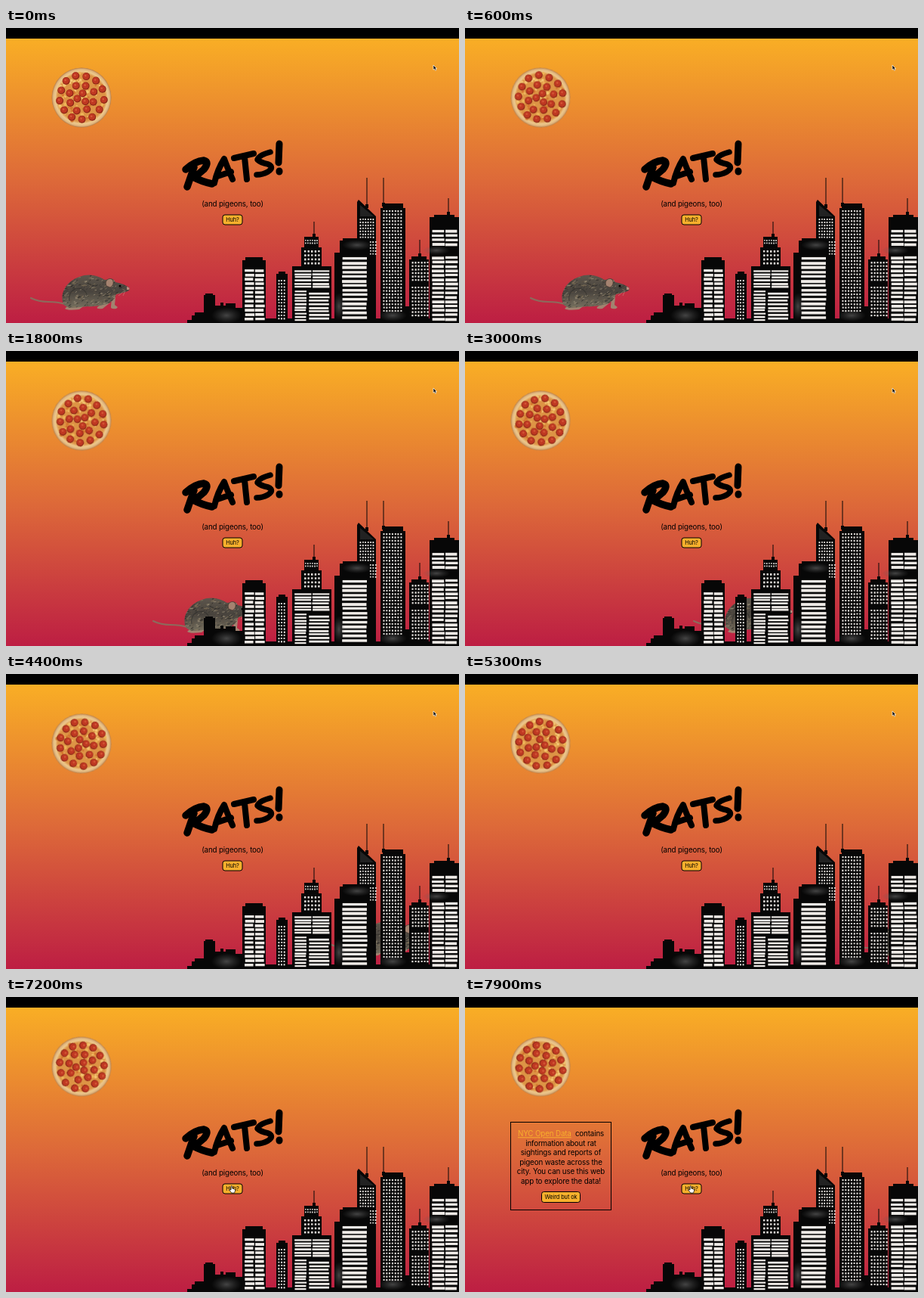
Animation, 600 px wide and 390 px high, one loop 8 s. Source, as an HTML page:

```html
<!DOCTYPE html>
<html lang="en">
<head>
<meta charset="utf-8">
<title>Rats!</title>
<style>
  html, body { margin: 0; width: 100%; height: 100%; overflow: hidden; background: #000; }
  svg { display: block; width: 600px; height: 390px; }
  text { font-family: Inter, Roboto, sans-serif; font-size: 9.8px; letter-spacing: -.15px; text-anchor: middle; }
  .button rect { fill: #f8b02c; stroke: #000; }
  .button text { font-size: 7.4px; letter-spacing: -.1px; }
  .link { fill: #f8b02c; text-decoration: underline; }
  .ink { fill: none; stroke: #000; stroke-linecap: round; stroke-linejoin: round; }
</style>
</head>
<body>
<svg viewBox="0 0 600 390">
  <defs>
    <linearGradient id="sky" x1="0" y1="0" x2="0" y2="1">
      <stop offset="0" stop-color="#f9ae25"/>
      <stop offset=".5" stop-color="#dd6939"/>
      <stop offset="1" stop-color="#bd1e43"/>
    </linearGradient>
    <linearGradient id="fur" x1="0" y1="0" x2="0" y2="1">
      <stop offset="0" stop-color="#5d564c"/>
      <stop offset=".5" stop-color="#48433d"/>
      <stop offset="1" stop-color="#77705f"/>
    </linearGradient>
    <radialGradient id="wash">
      <stop offset="0" stop-color="#777" stop-opacity=".55"/>
      <stop offset="1" stop-color="#555" stop-opacity="0"/>
    </radialGradient>
    <radialGradient id="crust">
      <stop offset=".8" stop-color="#dd9445"/>
      <stop offset=".88" stop-color="#edc98d"/>
      <stop offset=".95" stop-color="#dfb47d"/>
      <stop offset="1" stop-color="#b57a45"/>
    </radialGradient>
    <path id="body" d="M75 362C72 348 82 334 97 329C109 324 121 327 131 333L137 332Q142 330 145 336Q156 338 163 343Q165 346 161 348Q152 351 146 352Q143 362 133 365Q121 369 108 368L88 370Q77 370 75 362Z"/>
    <clipPath id="pelt"><use href="#body"/></clipPath>
  </defs>

  <rect width="600" height="390"/>
  <rect y="14" width="600" height="376" fill="url(#sky)"/>

  <g transform="translate(100 92)"><g id="pizza"></g></g>

  <g id="rat">
    <path d="M33 357Q43 362 56 362T78 365" fill="none" stroke="#8d6a5c" stroke-width="2.2" stroke-linecap="round"/>
    <path d="M84 365L78 371Q82 374 97 372L104 367M130 362L121 369Q119 372 128 371L138 363M140 358L139 368Q138 372 146 371L148 369L144 366L145 356" fill="#a28370"/>
    <use href="#body" fill="url(#fur)"/>
    <g id="hairs" clip-path="url(#pelt)" fill="none" stroke-width=".7"></g>
    <path d="M84 361Q82 349 92 345Q103 342 107 352" fill="none" stroke="#302e2b" stroke-width="1.2" opacity=".6"/>
    <path d="M133 341C130 334 136 330 140 332C144 335 142 341 138 343Z" fill="#a58370" stroke="#4b3a33" stroke-width=".8"/>
    <ellipse cx="151" cy="341" rx="1.5" ry="1.3"/>
    <path d="M160 342Q165 343 163 346L160 346Z" fill="#bd8b7e"/>
    <path d="M157 347L149 354M158 347L155 354" stroke="#d4b4a0" stroke-width=".4"/>
  </g>

  <g id="city"></g>

  <g class="ink" stroke-width="9" role="img" aria-label="Rats!">
    <path stroke-width="9.5" d="M249 184L240 210M238 187Q250 176 262 175Q270 177 262 187Q256 193 248 197Q259 203 273 206"/>
    <path stroke-width="8" d="M276 205Q280 187 289 173Q293 184 300 200M280 196L298 190"/>
    <path stroke-width="8" d="M302 172L328 166M316 171L319 200"/>
    <path stroke-width="7.5" d="M350 164Q335 168 333 174Q337 178 347 180Q356 184 347 190Q340 194 332 194"/>
    <path d="M362 153L361 178M362 189L362 190"/>
  </g>

  <text x="300" y="236">(and pigeons, too)</text>
  <g class="button">
    <rect x="287" y="247" width="26" height="13" rx="3"/>
    <text x="300" y="256.2">Huh?</text>
  </g>

  <g id="popup">
    <rect x="60.5" y="165.5" width="133" height="116" fill="none" stroke="#000"/>
    <g id="lines"></g>
    <g class="button">
      <rect x="101.5" y="257.5" width="51" height="14" rx="3"/>
      <text x="127" y="267.2">Weird but ok</text>
    </g>
  </g>

  <g id="cursor">
    <path id="arrow" d="M0 0V6.2L1.5 5L2.6 7.2L3.8 6.6L2.8 4.6H4.6Z" stroke="#fff" stroke-width=".7"/>
    <path id="hand" d="M0 0Q1-1 1.7 0V3L5 4Q6 5 5 8L4.4 9H.8L-2 5.5Q-2 4 0 5Z" fill="#fff" stroke="#000" stroke-width=".7"/>
  </g>
</svg>

<script>
const LOOP = 8000, TICK = 100, GROUND = 390;
const $ = id => document.getElementById(id);

let seed = 7;
const rnd = (a, b) => {
  seed = (seed * 16807) % 2147483647;
  return +(a + (b - a) * seed / 2147483647).toFixed(2);
};
const rect = (x, y, w, h, fill = '#070707') =>
  `<rect x="${x}" y="${y}" width="${w}" height="${h}" fill="${fill}"/>`;
const disc = (x, y, r, fill) =>
  `<circle cx="${x.toFixed(1)}" cy="${y.toFixed(1)}" r="${r}" fill="${fill}"/>`;

function drawPizza() {
  let s = disc(0, 0, 39.5, 'url(#crust)');
  for (let i = 0; i < 100; i++) {
    const a = rnd(0, 6.28), r = 33 * Math.sqrt(rnd(0, 1));
    s += disc(r * Math.cos(a), r * Math.sin(a), rnd(.8, 2.4), ['#f4c773', '#d5772f', '#edb457'][i % 3]);
  }
  // count, radius, starting angle
  for (const [n, ring, start] of [[13, 29, .1], [8, 17.5, .35], [3, 6.5, .8]]) {
    for (let i = 0; i < n; i++) {
      const a = start + i * 2 * Math.PI / n, r = ring + rnd(-1.2, 1.2);
      const x = r * Math.cos(a), y = r * Math.sin(a);
      s += disc(x, y, 5, '#8d2617') + disc(x - .3, y - .4, 4.2, '#bf3822') + disc(x - 1, y - 1, 1.3, '#d75a39');
    }
  }
  $('pizza').innerHTML = s;
}

function drawHairs() {
  let s = '';
  for (let i = 0; i < 330; i++) {
    const x = rnd(74, 160), y = rnd(326, 370);
    const tone = ['#23211f', '#8d7b5c', '#34322f', '#a79a80', '#5d5244'][i % 5];
    s += `<path d="M${x} ${y}l${rnd(-4, -1.5)} ${rnd(.2, 1.8)}" stroke="${tone}"/>`;
  }
  $('hairs').innerHTML = s;
}

// A block down to the ground with a narrower roof step
const tower = (x, top, w, inset = 0, step = 0) =>
  rect(x, top, w, GROUND - top) + rect(x + inset, top - step, w - 2 * inset, step + 1);

const spire = (x, top, base) =>
  rect(x - .5, top, 1, base - top) + rect(x - 2, base - 5, 4, 5);

// Uneven painted strips
function bars(x, y, w, bottom, columns = 1, gap = 5.8) {
  let s = '';
  const cw = w / columns;
  for (let v = y; v < bottom; v += gap)
    for (let c = 0; c < columns; c++)
      s += rect(x + c * cw + rnd(0, .8), v + rnd(-.4, .4), cw - rnd(1, 2.2), gap * .6 + rnd(-.4, .4), '#eeeae6');
  return s;
}

// Small square windows
function grid(x, y, w, bottom, size = 2) {
  let s = '';
  for (let v = y; v < bottom; v += size * 2.2)
    for (let u = x; u < x + w; u += size * 1.9)
      s += rect(u + rnd(-.2, .2), v, size, size + rnd(-.2, .5), '#e5e1dd');
  return s;
}

const wash = (x, y, rx, ry) =>
  `<ellipse cx="${x}" cy="${y}" rx="${rx}" ry="${ry}" fill="url(#wash)"/>`;

function drawCity() {
  const lowRoofs = '<path d="M240 390V386H246V380H250V376H262V353H264V351H274V353H277V367H284V363H288V367H291V364H304V370H314V390Z" fill="#070707"/>';
  const slant = '<path d="M465 300V230L467 227L490 249V390H465Z" fill="#070707"/><path d="M469 234L487 249H469Z" fill="#555" opacity=".35"/>';
  const podium = rect(313, 384, 287, 6);

  const west = tower(313, 307, 31, 4, 4) + bars(316, 319, 27, 384, 2)
    + tower(358, 325, 15, 3, 3) + grid(360.5, 333, 10, 384, 1.9);

  const middle = spire(408, 256, 277) + tower(391, 290, 27, 4, 14) + tower(379, 315, 52)
    + grid(395, 294, 21, 313, 2.4) + grid(396, 280, 18, 284, 1.6)
    + bars(382, 320, 47, 345, 2, 4.2) + bars(382, 347, 17, 386, 1, 4.2) + bars(401, 350, 28, 386, 1, 4.7);

  const tall = spire(478, 198, 238) + slant + tower(435, 297, 55) + tower(442, 281, 40, 4, 3)
    + bars(445, 303, 34, 383, 1, 6) + grid(468.5, 252, 19, 278, 1.8) + grid(482, 282, 7, 299, 1.8);

  const dotted = spire(500, 198, 236) + tower(496, 238, 33, 3, 6) + grid(499.5, 241, 26, 375)
    + tower(527, 368, 8) + spire(548, 280, 303) + tower(534, 306, 26, 3, 4)
    + grid(537.5, 309, 20, 336, 2.1) + grid(537.5, 342, 20, 382, 2.1);

  const east = spire(586, 225, 248) + tower(561, 250, 39, 6, 3)
    + bars(564, 267, 35, 287, 2) + bars(564, 302, 35, 384, 2);

  const shade = wash(292, 380, 20, 11) + wash(441, 368, 8, 18) + wash(465, 287, 20, 7)
    + wash(512, 380, 19, 8) + wash(570, 294, 18, 6);

  $('city').innerHTML = lowRoofs + podium + west + middle + tall + dotted + east + shade;
}

function drawLines() {
  const lines = ['<tspan class="link">NYC Open Data</tspan>&#160; contains', 'information about rat',
    'sightings and reports of', 'pigeon waste across the', 'city. You can use this web', 'app to explore the data!'];
  $('lines').innerHTML = lines.map((l, i) => `<text x="127" y="${(184.3 + i * 12.5).toFixed(1)}">${l}</text>`).join('');
}

// Rows are [time, style]; motion advances once per tick
function play(id, rows) {
  const frames = rows.map(([t, style], i) => {
    const span = (rows[i + 1]?.[0] ?? LOOP) - t;
    return { ...style, offset: t / LOOP, easing: `steps(${Math.max(1, Math.round(span / TICK))}, end)` };
  });
  $(id).animate(frames, { duration: LOOP, iterations: Infinity });
}
const at = (x, y) => ({ transform: `translate(${x}px, ${y}px)` });
const turn = deg => ({ transform: `rotate(${deg}deg)` });
const show = opacity => ({ opacity });
const HOVER = 6900;

drawPizza();
drawHairs();
drawCity();
drawLines();

play('pizza', [[0, turn(0)], [LOOP, turn(144)]]);
play('rat', [[0, at(0, 0)], [LOOP, at(720, 0)]]);
play('cursor', [
  [0, at(566, 49)], [5500, at(566, 49)], [5800, at(480, 100)], [6300, at(347, 177)],
  [HOVER, at(298, 250)], [LOOP, at(298, 250)],
]);
play('arrow', [[0, show(1)], [HOVER, show(1)], [HOVER, show(0)], [LOOP, show(0)]]);
play('hand', [[0, show(0)], [HOVER, show(0)], [HOVER, show(1)], [LOOP, show(1)]]);
play('popup', [
  [0, { ...show(0), ...at(-5, 0) }], [7300, { ...show(0), ...at(-5, 0) }],
  [7600, { ...show(1), ...at(0, 0) }], [LOOP, { ...show(1), ...at(0, 0) }],
]);
</script>
</body>
</html>
```
